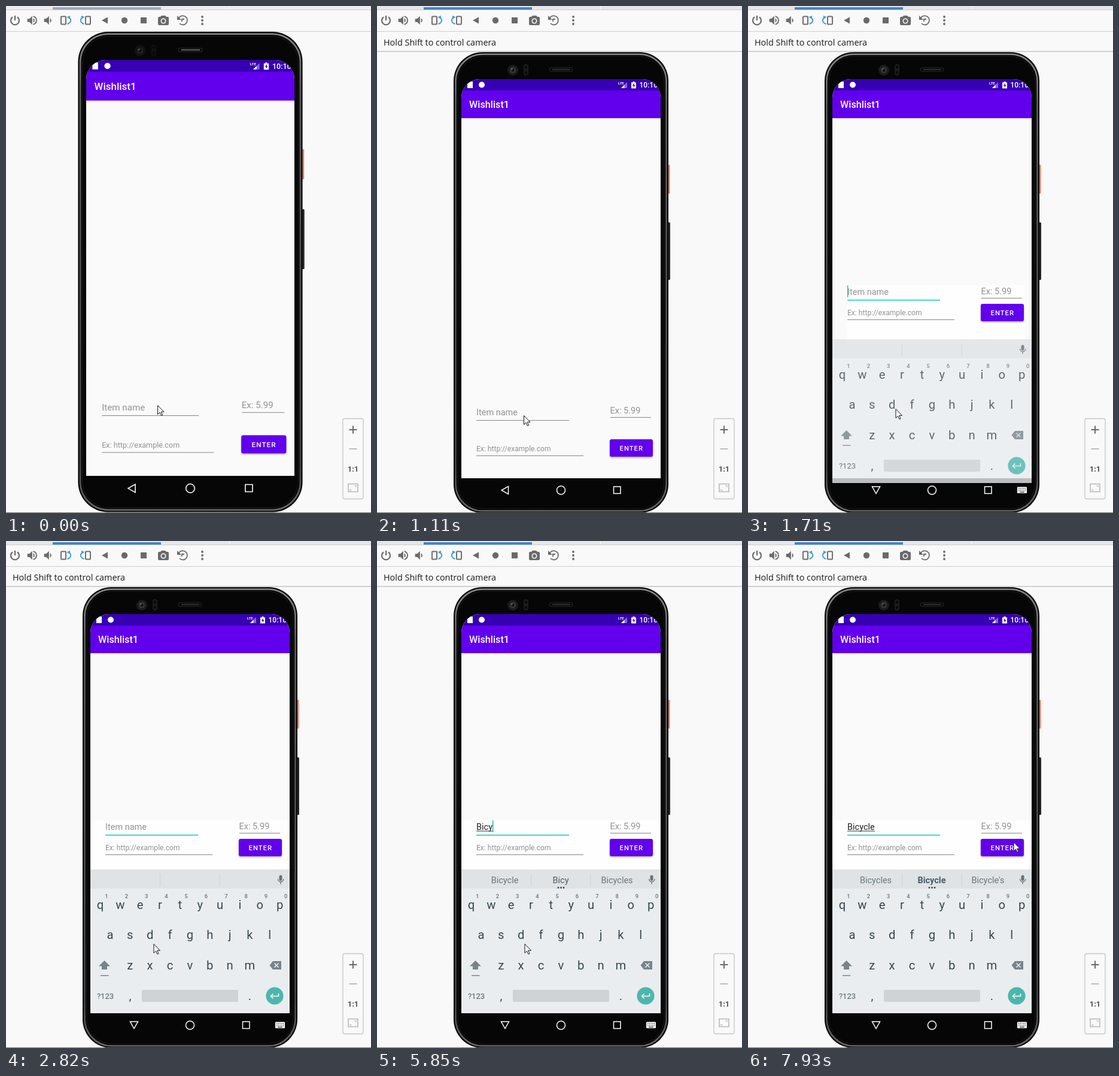
These frames come from a looping animation (610 by 846 pixels, 8 s). An HTML page with a canvas:

```html
<!DOCTYPE html>
<html lang="en">
<head>
<meta charset="utf-8">
<title>Wishlist</title>
<style>
  html, body { margin: 0; width: 100%; height: 100%; overflow: hidden; background: #f9f9f9; }
  canvas { display: block; }
</style>
</head>
<body>
<canvas id="stage" width="610" height="846"></canvas>
<script>
const ctx = document.getElementById('stage').getContext('2d');
const LOOP = 8000;
const ROBOTO = 'Roboto, sans-serif';

// Timelines: [start ms, value]; each value holds until the next start.
const POINTER = [
  [0, [253, 666]], [690, [253, 667]], [830, [251, 672]], [970, [248, 678]], [1110, [245, 683]],
  [1350, [246, 678]], [1470, [246.5, 672]], [7780, [400, 560]], [7930, [443.5, 502]]
];
const TYPED = [
  [0, ''], [3770, 'B'], [4620, 'Bi'], [5400, 'Bic'], [5730, 'Bicy'],
  [6130, 'Bicyc'], [6560, 'Bicycl'], [7080, 'Bicycle']
];
const SUGGESTIONS = [
  [0, null],
  [3910, ['By', 'B', 'But', 'bold']],
  [4740, ['Big', 'Bi', 'Bike', 'bold']],
  [5520, ['Bicycle', 'Bic', 'Bicycles']],
  [5850, ['Bicycle', 'Bicy', 'Bicycles']],
  [6280, ['Bicycle', 'Bicyc', 'Bicycles']],
  [6680, ['Bicycle', 'Bicycl', 'Bicycles']],
  [7230, ['Bicycles', 'Bicycle', "Bicycle's", 'bold']]
];
const CARET = [
  [0, false], [1350, true], [1830, false], [2360, true], [2820, false], [3350, true],
  [4370, false], [4620, true], [5250, false], [5400, true], [7630, false]
];
const KEYBOARD = [
  [0, null], [1590, { drop: 24, alpha: 0.45 }], [1710, { drop: 8, alpha: 0.8 }], [1830, { drop: 0, alpha: 1 }]
];
const at = (timeline, t) => timeline.findLast(([start]) => start <= t)[1];

function box(x, y, w, h, color, radius = 0) {
  ctx.fillStyle = color;
  ctx.beginPath();
  ctx.roundRect(x, y, w, h, radius);
  ctx.fill();
}
function outline(x, y, w, h, color, width = 1, radius = 0) {
  ctx.strokeStyle = color;
  ctx.lineWidth = width;
  ctx.beginPath();
  ctx.roundRect(x, y, w, h, radius);
  ctx.stroke();
}
function dot(x, y, r, color) {
  ctx.fillStyle = color;
  ctx.beginPath();
  ctx.arc(x, y, r, 0, 7);
  ctx.fill();
}
function fill(path, color) {
  ctx.fillStyle = color;
  ctx.fill(new Path2D(path), 'evenodd');
}
function line(path, color, width = 1) {
  ctx.strokeStyle = color;
  ctx.lineWidth = width;
  ctx.stroke(new Path2D(path));
}
function text(string, x, y, size, color, { weight = 400, align = 'left', family = ROBOTO, spacing = 0 } = {}) {
  ctx.font = `${weight} ${size}px ${family}`;
  ctx.textAlign = align;
  ctx.letterSpacing = spacing + 'px';
  ctx.fillStyle = color;
  ctx.fillText(string, x, y);
}
function placed(x, y, scaleX, scaleY, paint) {
  ctx.save();
  ctx.translate(x, y);
  ctx.scale(scaleX, scaleY);
  paint();
  ctx.restore();
}

function drawRotateIcon() {
  outline(92, 17.5, 8, 13, '#6e6e6e', 2, 1);
  line('M102.5 30 C109 28 110 22 105 19', '#389fd6', 2);
  fill('M101.5 18.5 L107 16 V22 Z', '#389fd6');
}

function drawSpeaker(color, loud) {
  fill('M3 9 v6 h4 l5 5 V4 L7 9 Z M16.5 12 c0 -1.8 -1 -3.3 -2.5 -4 v8 c1.5 -.7 2.5 -2.2 2.5 -4 Z', color);
  if (loud) line('M14 4.3 c8 2.6 8 12.800 0 15.400', color, 2.1);
}

function drawToolbar(hinted) {
  const gray = '#6a6a6a';
  box(0, 0, 610, 6, hinted ? '#e3e7eb' : '#ededf0');
  box(373, 0, 1, 6, '#f8f8f8');
  box(0, 6, 610, 1, '#cfcfcf');
  box(78, 2, 181, 4, hinted ? '#4083c9' : '#9ca8b9');
  box(0, 42, 610, 1, '#d0d0d0');

  line('M11 18.5 A7 7 0 1 0 19 18.5 M15 16 V24', gray, 2.2);
  placed(33, 13.2, 0.9, 0.9, () => drawSpeaker(gray, true));
  placed(61, 13.2, 0.9, 0.9, () => drawSpeaker(gray, false));
  drawRotateIcon();
  placed(233, 0, -1, 1, drawRotateIcon);

  fill('M160 24 L170 18.5 V29.5 Z', gray);
  dot(198, 24, 5.2, gray);
  box(225, 19, 10, 10, gray);
  box(254, 18, 18, 14, gray, 2);
  fill('M258 18 l2 -2 h6 l2 2 Z', gray);
  dot(263, 25, 4.5, '#f9f9f9');
  dot(263, 25, 2.9, gray);
  line('M289 20 A7.5 7.5 0 1 1 290 29 M294 26 V22 H298', gray, 1.8);
  fill('M286 16 V23 H293 Z', gray);
  for (const y of [18, 24, 30]) dot(328, y, 1.9, gray);

  if (hinted) {
    text('Hold Shift to control camera', 11, 66, 14.4, '#1a1a1a', { family: '"Open Sans", sans-serif' });
    box(0, 75, 610, 1.5, '#c4c4c4');
  }
}

function drawZoomPanel() {
  outline(563, 688.5, 34, 134, '#c6c6c6', 1.3, 3);
  line('M573.5 707 H586.5 M580 700.5 V713.5', '#6a6a6a', 2);
  line('M573.5 739 H586.5', '#bdbdbd', 2);
  text('1:1', 580, 776.5, 13, '#555', { weight: 700, align: 'center' });
  outline(572, 797.5, 16, 13, '#b8b8b8', 1.6);
  line('M575 806 V808 H578 M582 800.5 H585 V803', '#b8b8b8', 1.2);
}

function drawBody(hinted) {
  box(485, 265, 4.5, 48, '#dd7f69', 1);
  box(484, 361, 6, 96, '#262626', 1.5);
  box(128, 77, 359, 769, '#060606', 48);
  const rim = ctx.createLinearGradient(0, 77, 0, 846);
  rim.addColorStop(0, '#8c8c8c');
  rim.addColorStop(0.12, '#5c5c5c');
  rim.addColorStop(0.9, '#444');
  rim.addColorStop(1, '#6a6a6a');
  outline(131.5, 80.5, 352, 762, rim, 2.6, 45);
  outline(135, 84, 345, 755, '#1c1c1c', 1, 42);

  dot(227, 107, 9, hinted ? '#1c1c1c' : '#121212');
  dot(227, 107, 5, hinted ? '#3a3a3a' : '#222');
  dot(227, 107, 2.5, '#0d0d0d');
  dot(225.5, 105.5, 1, '#888');
  box(245, 97, 8, 19, hinted ? '#1b1b1b' : '#101010', 4);
  dot(249, 102, 2.2, '#080808');
  dot(249, 111, 2.2, '#080808');
  outline(288.5, 103, 38, 6, '#2b2b2b', 1, 2);
  line('M293 106 H323', hinted ? '#2e2e2e' : '#666', 2);
}

function drawStatusBar() {
  box(141, 122, 333, 19.5, '#3700b3');
  fill('M154 126 H160 V137 H151 V129 Z', '#fff');
  dot(175, 131.5, 5, '#fff');
  text('LTE', 403, 131, 6, '#fff', { weight: 700 });
  fill('M418 127 V137 H408 Z', '#8667d2');
  fill('M413.5 131.5 V137 H408 Z', '#fff');
  fill('M425 127.5 H427.5 V126 H430.5 V127.5 H433 V137.5 H425 Z M429.8 129 L426.8 133 H428.7 V136 L431.5 132 H429.8 Z', '#fff');
  text('10:10', 438.5, 136, 12, '#fff', { weight: 500 });
}

function drawForm(t, raised) {
  const typed = at(TYPED, t);
  const y = raised
    ? { name: 482, price: 481, url: 516, button: 497 }
    : { name: 683, price: 680, url: 743, button: 723 };
  const focused = t >= 1350;
  const hint = '#929292', rule = '#858585';

  text(typed || 'Item name', 166, y.name, 14.5, typed ? '#212121' : hint);
  const typedWidth = typed ? ctx.measureText(typed).width : 0;
  if (typed) box(166, y.name + 1.5, typedWidth, 1, '#333');
  if (at(CARET, t)) box(166 + typedWidth, y.name - 16, 1.4, 20, '#1fb8ab');
  box(166, y.name + 8, 155, focused ? 1.5 : 1, focused ? '#12c9bb' : rule);

  text('Ex: 5.99', 389.5, y.price, 14.5, hint);
  box(390, y.price + 6, 68, 1, rule);
  text('Ex: http://example.com', 166, y.url, 12.1, hint);
  box(166, y.url + 7, 179, 1, rule);

  ctx.save();
  ctx.shadowColor = 'rgba(0,0,0,.35)';
  ctx.shadowBlur = 3;
  ctx.shadowOffsetY = 1.5;
  box(389, y.button, 72, 29, '#6200ee', 3);
  ctx.restore();
  text('ENTER', 405.5, y.button + 19, 11.3, '#fff', { weight: 500, spacing: 1 });
}

function drawKeyboard(words) {
  const ink = '#37474f', soft = '#78848a';
  box(141, 548, 333, 32.5, '#dfe3e6');
  box(141, 580.5, 333, 207.5, '#e9edf0');
  box(257, 555, 1, 21, '#cdd3d6');
  box(356.5, 555, 1, 21, '#cdd3d6');
  box(456.5, 557.5, 5, 9.5, '#66747a', 2.5);
  line('M454.5 564 a4.7 4.7 0 0 0 9.4 0 M459 569 V572.5', '#66747a', 1.4);

  if (words) {
    const [left, middle, right, weight] = words;
    const center = { align: 'center' };
    text(left, 213.5, 571, 14.5, '#69767b', center);
    text(middle, 307, 571, 14.5, weight ? '#455a64' : '#4d5d65', { align: 'center', weight: weight ? 700 : 400 });
    text(right, 401, 571, 14.5, '#69767b', center);
    for (const x of [303, 307.5, 312]) dot(x, 578.5, 1.4, ink);
  }

  const rows = [['qwertyuiop', 157.5], ['asdfghjkl', 174], ['zxcvbnm', 207.3]];
  rows.forEach(([letters, x], row) => [...letters].forEach((letter, i) =>
    text(letter, x + 33.35 * i, 613.5 + 50.7 * row, 20.3, ink, { align: 'center' })));
  [...'1234567890'].forEach((digit, i) =>
    text(digit, 168 + 33.3 * i, 595.5, 9.3, '#66747a', { align: 'center', weight: 500 }));

  fill('M164.5 700 L174 709.5 H169 V715 H160 V709.5 H155 Z', soft);
  box(158, 724.5, 13.5, 1.5, soft);
  fill('M446 701 H460 V715 H446 L440.5 708 Z', soft);
  line('M448.5 704.5 l7 7 m0 -7 l-7 7', '#e9edf0', 1.6);

  text('?123', 166, 763.5, 13, '#4b5a61', { align: 'center' });
  text(',', 207.5, 765.5, 20, ink, { align: 'center' });
  text('.', 407.5, 765.5, 20, ink, { align: 'center' });
  box(227, 749, 161, 20, '#cfd3d6', 2);
  dot(449, 759, 14.6, '#4db6ac');
  line('M455.5 755 V759.5 H443 M446.5 755.5 L442.5 759.5 L446.5 763.5', '#fff', 1.6);
}

function drawNavBar(raised) {
  line(raised ? 'M207.5 802 H220.5 L214 813.5 Z' : 'M219.5 801.5 V814.5 L208 808 Z', '#fff', 1.5);
  line('M300.5 808 a7 7 0 1 0 14 0 a7 7 0 1 0 -14 0', '#fff', 1.5);
  outline(395.5, 802, 11.5, 11.5, '#fff', 1.5);
  if (!raised) return;
  box(450, 802.5, 16, 10.5, '#fff', 1);
  for (const y of [804.5, 807.5])
    for (let x = 452; x < 465; x += 2.7) box(x, y, 1.3, 1.3, '#111');
  box(454, 810.5, 8, 1.2, '#111');
}

function drawScreen(t) {
  const keyboard = at(KEYBOARD, t);
  ctx.save();
  ctx.beginPath();
  ctx.roundRect(141, 122, 333, 666, [31, 31, 0, 0]);
  ctx.clip();
  box(141, 122, 333, 666, '#fafafa');
  drawStatusBar();
  box(141, 187, 333, 1, '#d6d6d8');
  box(141, 188, 333, 1, '#eeeeef');
  box(141, 141, 333, 46, '#6200ee');
  text('Wishlist1', 154, 170, 16.2, '#fff', { weight: 500 });
  if (keyboard) {
    if (keyboard.drop) box(166, 466, 296, 100, '#fefefe');
    else box(141, 466, 333, 90, '#fefefe');
  }
  drawForm(t, Boolean(keyboard));
  ctx.restore();

  if (keyboard) {
    ctx.save();
    ctx.globalAlpha = keyboard.alpha;
    ctx.translate(0, keyboard.drop);
    drawKeyboard(at(SUGGESTIONS, t));
    ctx.restore();
  }
  drawNavBar(Boolean(keyboard));
}

function drawPointer([x, y]) {
  placed(x, y, 1, 1, () => {
    const arrow = 'M.5 .5 V15.5 L4 12.2 L6.5 17.5 L8.6 16.5 L6.2 11.3 H11 Z';
    fill(arrow, '#fff');
    line(arrow, '#111', 1);
  });
}

function drawDevice(t, hinted) {
  drawBody(hinted);
  drawScreen(t);
}

function draw(t) {
  const hinted = t >= 120;
  box(0, 0, 610, 846, '#f9f9f9');
  drawToolbar(hinted);
  drawZoomPanel();
  // Without the hint bar the device grows into the extra room.
  const [scaleX, scaleY] = hinted ? [1, 1] : [348 / 333, 694 / 666];
  const [left, top] = hinted ? [141, 122] : [134, 90];
  placed(left - 141 * scaleX, top - 122 * scaleY, scaleX, scaleY, () => drawDevice(t, hinted));
  box(0, 845, 610, 1, '#6b6b6b');
  drawPointer(at(POINTER, t));
}

function tick() {
  draw(performance.now() % LOOP);
  requestAnimationFrame(tick);
}
tick();
</script>
</body>
</html>
```
